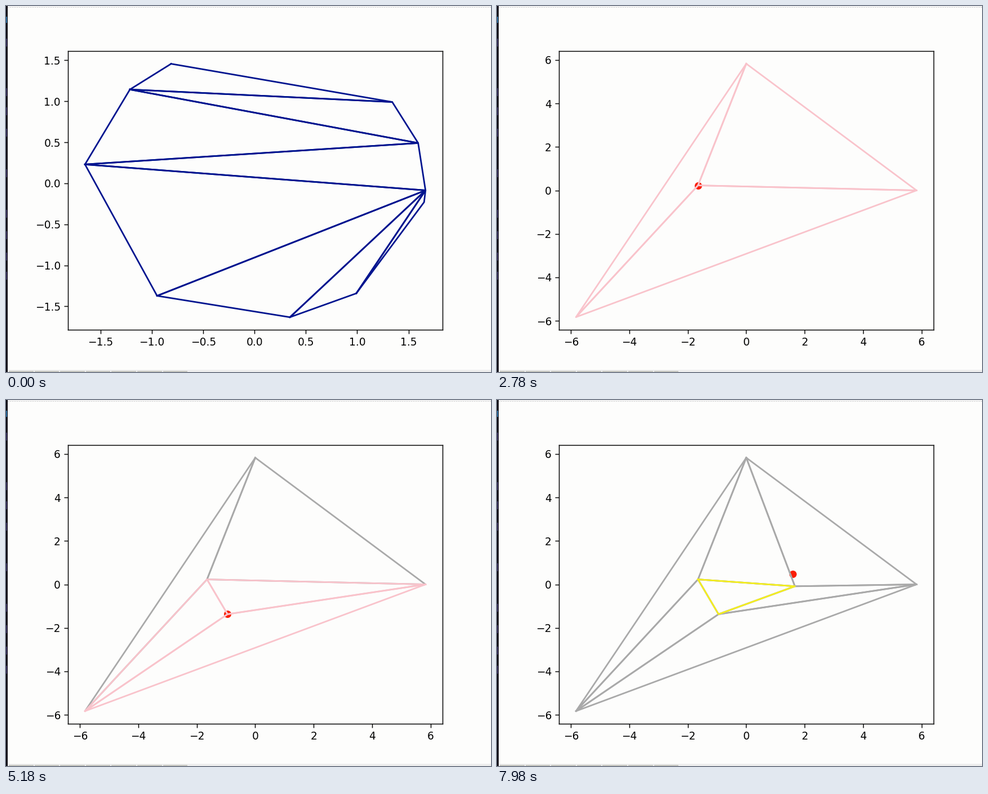
Animation, 861 px wide and 650 px high, one loop 8000 ms. Source, as a matplotlib script:

```python
from itertools import combinations

import numpy as np
import matplotlib.pyplot as plt
from matplotlib.animation import FuncAnimation
from matplotlib.collections import LineCollection
from matplotlib.patches import Rectangle
from matplotlib.ticker import MultipleLocator

W, H, DPI = 861, 650, 128
K = 134 / DPI                      # plot scale
STEP, LOOP = 40, 8000              # ms
START, CYCLE = 840, 2185           # first insertion, time per point

PAPER = "#fdfdfc"
NAVY, GRAY, PINK = "#00148f", "#a9a9a9", "#f9c3cb"
YELLOW, RED = "#f6f01e", "#fa1e05"

plt.rcParams.update({
    "font.family": "DejaVu Sans",
    "font.size": 10 * K,
    "axes.linewidth": 0.8 * K,
    "xtick.major.size": 3.5 * K, "ytick.major.size": 3.5 * K,
    "xtick.major.width": 0.8 * K, "ytick.major.width": 0.8 * K,
    "xtick.major.pad": 3.5 * K, "ytick.major.pad": 3.5 * K,
})

# Ten points on a circle, counter-clockwise, and the outer triangle
R, S = 1.668, 5.83
DEGREES = dict(a=119.17, b=136.72, c=172.06, d=235.30, e=281.92,
               f=306.47, g=352.08, h=357.05, i=17.11, j=36.45)
POS = {k: (R * np.cos(np.radians(t)), R * np.sin(np.radians(t)))
       for k, t in DEGREES.items()}
POS.update(A=(0, S), B=(S, 0), C=(-S, -S))

FINAL = ["abj", "bij", "bci", "chi", "cdh", "deh", "efh", "fgh"]
# point, triangle under test, triangles to be replaced
INSERTS = [("c", "ABC", ["ABC"]),
           ("d", "BCc", ["BCc"]),
           ("h", "Bcd", ["ABc", "Bcd"]),
           ("i", "cdh", [])]


def insert(mesh, bad, p):
    """Replace the bad triangles by a fan around p."""
    edges = [e for t in bad for e in combinations(t, 2)]
    fan = ["".join(sorted(e + (p,))) for e in edges if edges.count(e) == 1]
    return [t for t in mesh if t not in bad], fan


def build_stages():
    """List of (time, dot, gray, colored triangles, color)."""
    stages, mesh = [], ["ABC"]
    for n, (p, test, bad) in enumerate(INSERTS):
        t = START + n * CYCLE
        stages.append((t, p, mesh, [], PINK))
        stages.append((t + CYCLE / 6, p, mesh, [test], YELLOW))
        if bad:
            keep, fan = insert(mesh, bad, p)
            stages.append((t + CYCLE / 3, p, mesh, bad, PINK))
            stages.append((t + CYCLE * 2 / 3, p, keep, fan, PINK))
            mesh = keep + fan
    return stages


STAGES = build_stages()


def outline(tri):
    return [POS[k] for k in tri + tri[0]]


fig = plt.figure(figsize=(W / DPI, H / DPI), dpi=DPI, facecolor=PAPER)


def draw_border():
    back = fig.add_axes([0, 0, 1, 1], zorder=-1)
    back.set(xlim=(0, W), ylim=(H, 0))
    back.axis("off")

    def box(x, y, w, h, color):
        back.add_patch(Rectangle((x, y), w, h, color=color, lw=0))

    box(0, 0, W, 3, "#f2f2f2")
    for x in range(3, W, 4):
        box(x, 2, 2, 1, "#d4d4d4")
    box(0, 646, W, 4, "#eeeeee")
    for n in range(7):
        box(5 + 45.6 * n, 648, 43.6, 2, "#c6c6c0")
    box(0, 0, 2.6, H, "#121018")
    box(0, 19, 2, 11, "#2a6a9c")
    for y in (58, 146, 180, 218, 290, 362, 400, 438, 472):
        box(0, y, 1.6, 14, "#37305a")


draw_border()
ax = fig.add_axes([110 / W, 1 - 575 / H, 665 / W, 495 / H], facecolor="none")
dot, = ax.plot([], [], "o", color=RED, ms=6 * K, mew=K, zorder=1)
style = dict(linewidths=1.5 * K, capstyle="projecting", joinstyle="round")
base = LineCollection([], zorder=2, **style)
marked = LineCollection([], zorder=3, **style)
ax.add_collection(base, autolim=False)
ax.add_collection(marked, autolim=False)


def set_view(xlim, ylim, tick):
    ax.set(xlim=xlim, ylim=ylim)
    for axis in (ax.xaxis, ax.yaxis):
        axis.set_major_locator(MultipleLocator(tick))


def update(n):
    t = n * STEP
    if t < START:
        set_view((-1.818, 1.832), (-1.785, 1.612), 0.5)
        dot.set_data([], [])
        base.set_segments([outline(k) for k in FINAL])
        base.set_color(NAVY)
        marked.set_segments([])
    else:
        _, p, gray, tris, color = [s for s in STAGES if s[0] <= t][-1]
        lim = (-1.1 * S, 1.1 * S)
        set_view(lim, lim, 2)
        dot.set_data([POS[p][0]], [POS[p][1]])
        base.set_segments([outline(k) for k in gray])
        base.set_color(GRAY)
        marked.set_segments([outline(k) for k in tris])
        marked.set_color(color)
    return dot, base, marked


anim = FuncAnimation(fig, update, frames=LOOP // STEP, interval=STEP,
                     init_func=lambda: update(0), repeat=True,
                     repeat_delay=0, blit=False)
plt.show()
```
